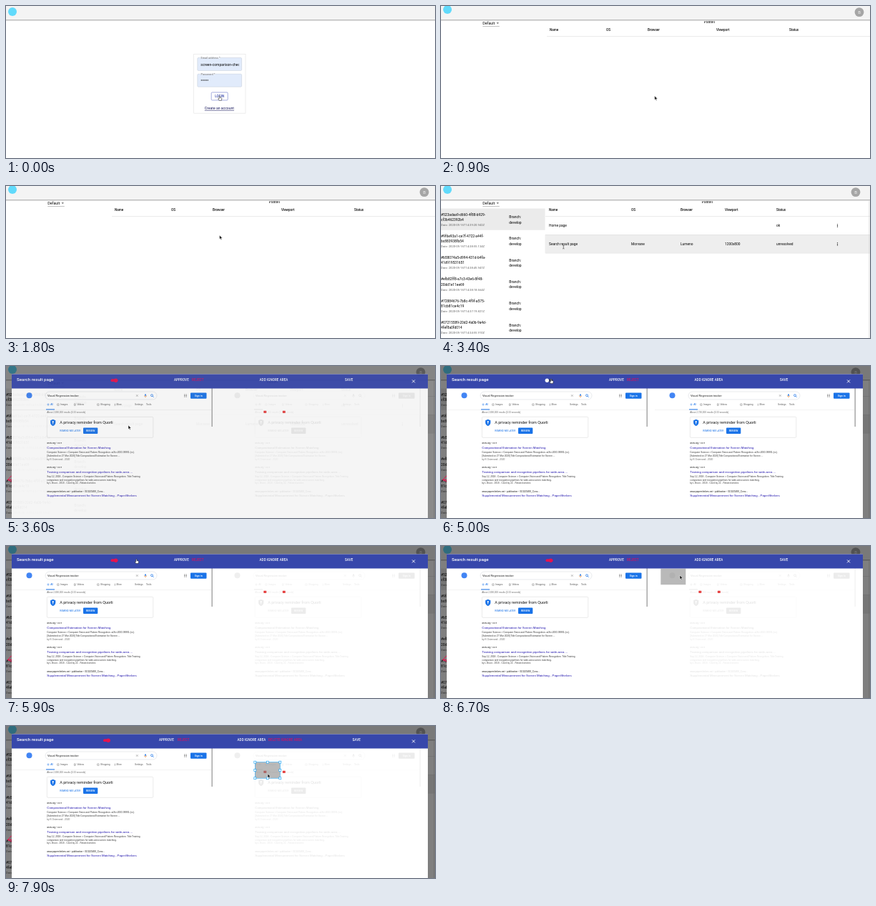
An HTML page for the animation above (8 s loop, 600x213 px).

```html
<!DOCTYPE html>
<html lang="en">
<head>
<meta charset="utf-8">
<title>Screenshot review</title>
<style>
  html, body { margin: 0; width: 100%; height: 100%; overflow: hidden; background: #fff; }
  svg { display: block; width: 600px; height: 213px; font-family: Roboto, Arial, sans-serif; }
  text { white-space: pre; }
</style>
</head>
<body>
<svg id="stage" viewBox="0 0 600 213"></svg>
<script>
const LOOP = 8000;
const NS = 'http://www.w3.org/2000/svg';
const BLUE = '#1a73e8', INDIGO = '#3747ab', PINK = '#e5134f', SANS = 'Liberation Sans, Arial, sans-serif';
const stage = document.getElementById('stage');

function el(parent, tag, attrs = {}) {
  const node = document.createElementNS(NS, tag);
  for (const key in attrs) node.setAttribute(key, attrs[key]);
  return parent.appendChild(node);
}
const group = (parent, attrs) => el(parent, 'g', attrs);
const rect = (parent, x, y, width, height, fill, more) =>
  el(parent, 'rect', { x, y, width, height, fill, ...more });
const circle = (parent, cx, cy, r, fill, more) => el(parent, 'circle', { cx, cy, r, fill, ...more });
const path = (parent, d, stroke, width, more) =>
  el(parent, 'path', { d, stroke, 'stroke-width': width, fill: 'none', ...more });
// y is the middle of the line of text
function label(parent, x, y, size, content, fill = '#000', more = {}) {
  const node = el(parent, 'text', { x, y: y + size * 0.35, 'font-size': size, fill, ...more });
  node.textContent = content;
  return node;
}
function clip(id, x, y, width, height) {
  rect(el(stage, 'clipPath', { id }), x, y, width, height);
}
const bold = { 'font-weight': 500 };
const show = (node, on) => node.setAttribute('display', on ? 'inline' : 'none');
const move = (node, x, y) => node.setAttribute('transform', `translate(${x} ${y})`);

const clamp = v => Math.min(1, Math.max(0, v));
const ease = v => v * v * (3 - 2 * v);
const progress = (t, from, to) => ease(clamp((t - from) / (to - from)));

function appBar(parent, logoY) {
  rect(parent, 0, 0, 600, 19, '#f4f4f4');
  rect(parent, 0, 19, 600, 1, '#b9b9b9');
  rect(parent, 0, 20, 600, 1, '#e3e3e3');
  circle(parent, 9, logoY, 6, '#61dafb');
}

function field(parent, y, width, name) {
  rect(parent, 267.8, y, 61.8, 18, '#e1ebfb', { rx: 1.3, stroke: '#c3cad6', 'stroke-width': 0.5 });
  rect(parent, 271.5, y - 1, width, 2, '#f3f6fc');
  label(parent, 272.5, y + 0.5, 3.9, name, '#666');
}

function buildLogin() {
  const g = group(stage);
  appBar(g, 8);
  rect(g, 262.7, 67.5, 72.3, 82.7, '#fff', { stroke: '#e2e2e2', 'stroke-width': 0.6 });
  field(g, 72.5, 28, 'Email address *');
  field(g, 95.3, 21, 'Password *');
  label(g, 272.3, 82, 5, 'screen-comparison-checke', '#000', { 'clip-path': 'url(#email)' });
  for (let i = 0; i < 6; i++) circle(g, 273.3 + i * 1.8, 104, 0.65, '#222');
  rect(g, 287.2, 121, 23, 11, '#fff', { rx: 1.2, stroke: '#7f8ad0', 'stroke-width': 0.7 });
  label(g, 298.7, 126.6, 4.5, 'LOGIN', INDIGO, { ...bold, 'text-anchor': 'middle' });
  label(g, 277.8, 143.5, 5.1, 'Create an account', '#1a1a5e', { 'text-decoration': 'underline' });
  return g;
}

function tableHead(parent, xs, left) {
  ['Name', 'OS', 'Browser', 'Viewport', 'Status'].forEach((name, i) =>
    label(parent, xs[i], 33.5, 4.6, name, '#111', bold));
  rect(parent, left, 42, 600 - left, 0.6, '#dedede');
}

function buildList(parent) {
  const builds = [
    ['#523adaa9-d660-4f88-b929-', 'cf3b462392b4', '14:39:20.942Z'],
    ['#9f6e93a1-ce7f-4722-a44f-', 'bc883938fb54', '14:38:55.134Z'],
    ['#b58074a5-d994-431d-b4fa-', '41d919531651', '14:38:45.947Z'],
    ['#efb82ff8-a7c3-43e6-8f48-', '20dd1e11ee69', '14:38:18.664Z'],
    ['#72884676-7b8c-4f9f-a575-', '81cb81ce4c19', '14:37:19.821Z'],
    ['#07215589-20d2-4a0b-9a4d-', '4fef8a0fd014', '14:34:55.910Z']
  ];
  rect(parent, 0, 31.5, 145.5, 30.3, '#ebebeb');
  builds.forEach(([head, tail, time], i) => {
    const y = 39.8 + i * 30.3;
    label(parent, 0, y, 4.9, head);
    label(parent, 0, y + 7.2, 4.9, tail);
    label(parent, 0, y + 14.5, 4.2, 'Date: 2020-05-16T' + time, '#666');
    label(parent, 95.3, y + 3.6, 5, 'Branch:');
    label(parent, 95.3, y + 11, 5, 'develop');
  });
}

function buildDashboard() {
  const g = group(stage);
  const pannel = label(g, 367.8, 21.8, 5.6, 'Pannel', '#000', { 'font-family': 'Liberation Serif, Times, serif' });
  label(g, 58.3, 24, 5.3, 'Default');
  el(g, 'path', { d: 'M77.7 23.2h3.2l-1.6 1.7z', fill: '#555' });
  rect(g, 58.3, 28.2, 23.5, 0.6, '#999');

  const empty = group(g);
  tableHead(empty, [152, 231, 289, 385, 487], 148);

  const full = group(g);
  const cols = [151, 266, 335, 397, 469];
  const hover = rect(full, 145.5, 68, 454.5, 26, '#eeeeee');
  tableHead(full, cols, 146);
  [['Home page', '', '', '', 'ok'],
   ['Search result page', 'Morvane', 'Lumeno', '1200x800', 'unresolved']].forEach((row, r) => {
    const y = 55.2 + r * 25.8;
    row.forEach((cell, i) => label(full, cols[i], y, 4.85, cell));
    rect(full, 146, y + 12.8, 454, 0.6, '#dedede');
    for (let d = -1; d < 2; d++) circle(full, 554.5, y + 0.3 + d * 1.7, 0.65, '#333');
  });
  buildList(full);
  rect(full, 598.6, 21, 0.7, 192, '#d0d0d0');

  appBar(g, 5);
  const avatar = group(g);
  circle(avatar, 0, 8.6, 6.4, '#a6a6a6');
  label(avatar, 0, 8.8, 6, 'B', '#f2f2f2', { 'text-anchor': 'middle' });
  return { g, pannel, empty, full, hover, avatar };
}

function searchPage(parent, dx, count) {
  const g = group(parent, { transform: `translate(${dx} 0)`, 'clip-path': 'url(#pane)' });
  const sans = { 'font-family': SANS };
  const link = (y, content) => label(g, 57.3, y, 4.35, content, '#1a0dab', sans);
  const line = (y, content, fill = '#333') => label(g, 57.3, y, 3.2, content, fill, sans);
  rect(g, 8, 31, 281, 155, '#fff');
  circle(g, 32.5, 41.3, 4, '#4285f4');

  rect(g, 55, 36, 156, 11, '#fff', { rx: 5.5, stroke: '#dfe1e5', 'stroke-width': 0.7 });
  label(g, 58, 41.5, 3.85, 'Visual Regression tracker', '#111', sans);
  path(g, 'M182 40.2l2.6 2.6m0-2.6l-2.6 2.6', '#777', 0.5);
  rect(g, 194.2, 39.3, 1.6, 2.8, BLUE, { rx: 0.8 });
  path(g, 'M193.3 41.3a1.7 1.7 0 0 0 3.4 0M195 43v1.2', '#e8710a', 0.5);
  path(g, 'M205 42.2l1.6 1.6', BLUE, 0.8);
  circle(g, 204, 41.2, 1.5, 'none', { stroke: BLUE, 'stroke-width': 0.7 });
  for (let i = 0; i < 9; i++) rect(g, 249 + i % 3 * 1.5, 39.6 + Math.floor(i / 3) * 1.5, 0.9, 0.9, '#777');
  rect(g, 258, 37.5, 22.5, 8.3, BLUE, { rx: 1 });
  label(g, 269.2, 41.7, 3.6, 'Sign in', '#fff', { ...bold, 'text-anchor': 'middle' });

  circle(g, 59, 54, 1.1, 'none', { stroke: BLUE, 'stroke-width': 0.5 });
  label(g, 62.3, 54.2, 3.3, 'All', BLUE, sans);
  [['Images', 76], ['Videos', 99.5], ['Shopping', 132], ['More', 154.5], ['Settings', 180], ['Tools', 196]]
    .forEach(([name, x], i) => {
      label(g, x, 54.2, 3.2, name, '#555', sans);
      if (i < 3) rect(g, x - 4.2, 53, 2.2, 2.2, 'none', { stroke: '#777', 'stroke-width': 0.5 });
      if (i === 3) rect(g, x - 2.6, 52.7, 0.6, 3, '#777');
    });
  rect(g, 8, 61.2, 279, 0.5, '#e6e6e6');
  rect(g, 56, 60.4, 12, 1, BLUE);
  label(g, 57.3, 65, 3.1, `About ${count} results (0.33 seconds)`, '#666', sans);

  rect(g, 57.3, 71.3, 148.5, 29, '#fff', { rx: 1.3, stroke: '#dcdcdc', 'stroke-width': 0.6 });
  el(g, 'path', { d: 'M65.7 74.8l3.6 1.4v3q0 3.2-3.6 4.8q-3.6-1.6-3.6-4.8v-3z', fill: BLUE });
  circle(g, 65.7, 78.2, 1.1, '#fff');
  rect(g, 65.3, 78.5, 0.8, 3, '#fff');
  label(g, 75.3, 79.5, 5.5, 'A privacy reminder from Quorli', '#111');
  label(g, 75.3, 90.8, 3.4, 'REMIND ME LATER', BLUE);
  rect(g, 108, 86.6, 20.3, 8.4, BLUE, { rx: 1 });
  label(g, 118.2, 91, 3.5, 'REVIEW', '#fff', { ...bold, 'text-anchor': 'middle' });

  line(108, 'arxiv.org › cs ▾', '#111');
  link(114.4, 'Compositional Estimation for Screen Matching');
  line(120.9, 'Computer Science > Computer Vision and Pattern Recognition. arXiv:2003.99991 (cs).');
  line(126, '[Submitted on 27 Mar 2020] Title:Compositional Estimation for Screen ...');
  line(131, 'by K Ostervand - 2020', '#666');

  line(142.3, 'arxiv.org › cs ▾', '#111');
  link(148.4, 'Training comparison and recognition pipelines for wide-area ...');
  line(154.6, 'Sep 12, 2018 - Computer Science > Computer Vision and Pattern Recognition. Title:Training');
  line(159.4, 'comparison and recognition pipelines for wide-area screen matching.');
  line(164.3, 'by L Brunt - 2018 - Cited by 22 - Related articles', '#444');

  line(175.4, 'www.papershelves.net › publication › 315225493_Conv...', '#111');
  link(181.6, 'Supplemental Measurement for Screen Matching - PaperShelves');
  rect(g, 287.4, 31, 1.6, 54, '#adadad');
  return g;
}

function buildModal() {
  const backdrop = rect(stage, 0, 0, 600, 213, '#000');
  const g = group(stage);
  path(g, 'M8 153.5L2.5 159.5L8 162M2.5 159.5H8', PINK, 1);
  rect(g, 8, 11.5, 582, 202, '#fff');
  searchPage(g, 0, '2,690,000');
  const second = group(g);
  searchPage(second, 291, '2,730,000');
  const marks = group(g);
  [360.5, 387].forEach(x => {
    rect(marks, x, 62.8, 3.6, 3, '#e01515');
    rect(marks, x + 1.6, 63.3, 0.5, 2, '#fff');
  });

  const area = group(g);
  rect(area, 0, 0, 35, 22.5, '#808080', { 'fill-opacity': 0.55 });
  const handles = group(area);
  rect(handles, 0, 0, 35, 22.5, 'none', { stroke: '#2ba9f5', 'stroke-width': 0.6 });
  for (const x of [0, 17.5, 35]) for (const y of [0, 11.25, 22.5])
    if (x !== 17.5 || y !== 11.25)
      rect(handles, x - 1.5, y - 1.5, 3, 3, '#fff', { stroke: '#2ba9f5', 'stroke-width': 0.7 });

  rect(g, 8, 11.5, 582, 20, INDIGO);
  label(g, 15, 19.3, 6.2, 'Search result page', '#fff', bold);
  const track = rect(g, 0, 18.3, 10, 3.8, PINK, { rx: 1.9 });
  const thumb = circle(g, 0, 20.2, 2.7, '#fff');
  const button = (name, fill = '#fff') => label(g, 0, 19.9, 4.5, name, fill, { ...bold, 'letter-spacing': 0.1 });
  const buttons = [button('APPROVE'), button('REJECT', '#d3145f'), button('ADD IGNORE AREA'),
    button('DELETE IGNORE AREA', '#d3145f'), button('SAVE')];
  path(g, 'M568 19.4l4 4m0-4l-4 4', '#fff', 0.9);
  return { backdrop, g, second, marks, area, handles, track, thumb, buttons };
}

function buildCursors() {
  const look = { fill: '#111', stroke: '#fff', 'stroke-width': 0.5, 'stroke-linejoin': 'round' };
  const arrow = el(stage, 'path', { d: 'M0 0V5.6L1.3 4.5L2.2 6.5L3.2 6.1L2.3 4.1H4.1Z', ...look });
  const hand = el(stage, 'path', {
    d: 'M-.6 .5Q0-.4.6 .5V2.4L2.8 3Q3.3 3.2 3.1 4L2.6 6.4H-.6L-2.2 3.9Q-1.9 3.1-.6 4Z',
    ...look, fill: '#fff', stroke: '#111'
  });
  const beam = path(stage, 'M-1 0Q0 0 .3 .7Q.6 0 1.6 0M.3 .7V4.3M-1 5Q0 5 .3 4.3Q.6 5 1.6 5', '#333', 0.6);
  return { arrow, hand, beam };
}

clip('pane', 8, 31, 282, 154.5);
clip('email', 268, 73, 58, 17);
rect(stage, 0, 0, 600, 213, '#fff');
const login = buildLogin();
const dash = buildDashboard();
const modal = buildModal();
const cursors = buildCursors();

const SIGNED_IN = 500, LOADED = 2200, OPEN = 3415, DIFF_OFF = 4700, DIFF_ON = 5700;
const AREA_ADDED = 6300, AREA_PICKED = 6950, DRAG_END = 7650;

// time, x, y of the pointer tip
const route = [
  [0, 298.7, 126], [1000, 298.7, 126], [1550, 298.5, 69], [2350, 298.5, 69], [3200, 171, 83],
  [3850, 171, 83], [4500, 154, 18], [5800, 154, 18], [6250, 375, 19], [6350, 375, 19],
  [6670, 334, 41], [6750, 334, 41], [AREA_PICKED, 325, 48], [DRAG_END, 366, 67], [LOOP, 366, 67]
];

function pointer(t) {
  const i = route.findIndex(stop => stop[0] > t);
  const [t0, x0, y0] = route[i - 1], [t1, x1, y1] = route[i];
  const k = progress(t, t0, t1);
  return [x0 + (x1 - x0) * k, y0 + (y1 - y0) * k];
}

function update(t) {
  const [x, y] = pointer(t);
  const loaded = t >= LOADED, open = t >= OPEN, picked = t >= AREA_PICKED;

  show(login, t < SIGNED_IN);
  show(dash.g, t >= SIGNED_IN);
  show(dash.empty, !loaded);
  show(dash.full, loaded);
  const overRow = open || (y > 68 && y < 94 && x > 146);
  show(dash.hover, overRow);
  dash.pannel.setAttribute('x', loaded ? 364.8 : 367.8);
  move(dash.avatar, loaded ? 580 : 585, 0);

  const fade = progress(t, OPEN, OPEN + 225);
  show(modal.backdrop, open);
  show(modal.g, open);
  modal.backdrop.setAttribute('opacity', 0.5 * fade);
  modal.g.setAttribute('opacity', fade);

  const diff = t < DIFF_OFF || t >= DIFF_ON;
  modal.second.setAttribute('opacity', diff ? 0.12 : 1);
  modal.second.style.filter = diff ? 'grayscale(1)' : 'none';
  show(modal.marks, diff);

  const on = 1 - progress(t, DIFF_OFF, DIFF_OFF + 150) + progress(t, DIFF_ON, DIFF_ON + 150);
  const left = picked ? 136 : 146.5;
  modal.track.setAttribute('x', left);
  modal.track.setAttribute('fill', on > 0.5 ? PINK : '#2c3568');
  modal.thumb.setAttribute('cx', left + 1.8 + 5.2 * on);
  modal.thumb.setAttribute('fill', on > 0.5 ? PINK : '#fafafa');

  const places = picked ? [214, 240, 323.5, 367, 484.5] : [235, 260, 354.5, 0, 474];
  modal.buttons.forEach((button, i) => button.setAttribute('x', places[i]));
  show(modal.buttons[3], picked);

  const drag = progress(t, AREA_PICKED, DRAG_END);
  show(modal.area, t >= AREA_ADDED);
  show(modal.handles, picked);
  move(modal.area, 307.3 + 41 * drag, 31.7 + 19 * drag);

  const shape = t < SIGNED_IN || (open && y < 24) ? 'hand'
    : !open && loaded && overRow && x < 194 ? 'beam' : 'arrow';
  for (const name in cursors) {
    show(cursors[name], name === shape);
    move(cursors[name], x, y);
  }
}

const start = performance.now();
function frame() {
  update((performance.now() - start) % LOOP);
  requestAnimationFrame(frame);
}
update(0);
requestAnimationFrame(frame);
</script>
</body>
</html>
```
